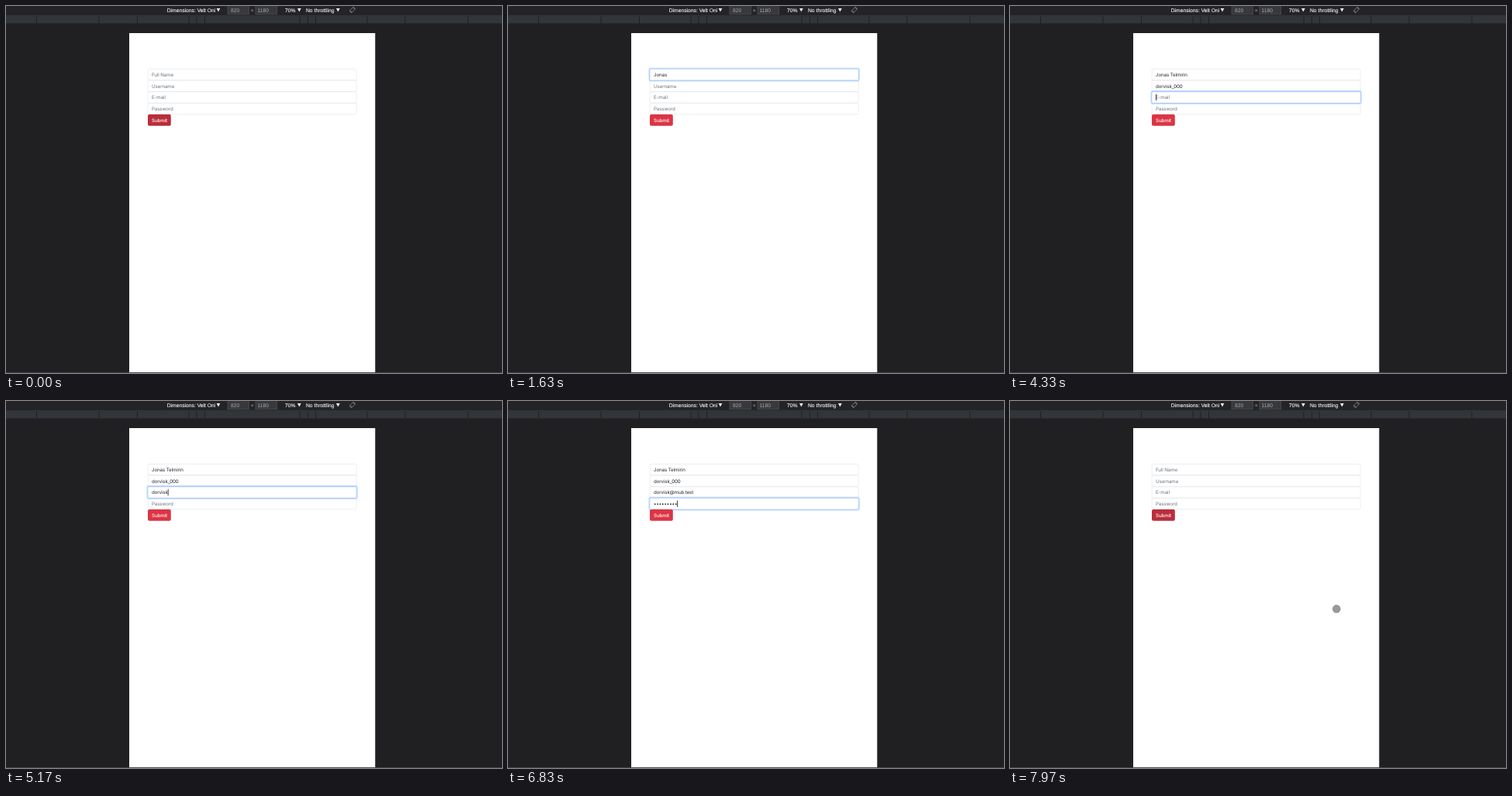
An HTML page for the animation above (8000 ms loop, 640 by 474 pixels).

```html
<!DOCTYPE html>
<html lang="en">
<head>
<meta charset="utf-8">
<title>Sign-up form</title>
<style>
  html, body { margin: 0; width: 100%; height: 100%; overflow: hidden; background: #202022; }
  svg { display: block; width: 100vw; height: 100vh; }
  text { white-space: pre; text-rendering: geometricPrecision; }
  .bar text { font: 6.75px "Liberation Sans", Arial, sans-serif; fill: #eeeff1; stroke: #eeeff1; stroke-width: .12; }
  .bar .dim { fill: #a9abae; stroke: none; }
  .bar rect.box { fill: #38393c; stroke: #55575b; stroke-width: .6; }
  .page text { font: 16px Inter, "Open Sans", sans-serif; letter-spacing: -.02em; }
</style>
</head>
<body>
<svg viewBox="0 0 640 474" preserveAspectRatio="none">
  <rect width="640" height="474" fill="#202022"/>
  <g class="bar">
    <rect width="640" height="12.4" fill="#242427"/>
    <rect y="12.4" width="640" height="1" fill="#434447"/>
    <rect y="13.4" width="640" height="9" fill="#32363b"/>
    <g id="marks"></g>
    <text x="207.7" y="7.5">Dimensions: Velt Oni</text>
    <rect class="box" x="286" y="-1" width="27.4" height="11.8"/>
    <rect class="box" x="322" y="-1" width="27.8" height="11.8"/>
    <text class="dim" x="290" y="7.7">820</text>
    <text class="dim" x="315.7" y="8">×</text>
    <text class="dim" x="324.5" y="7.7">1180</text>
    <text x="360" y="7.5">70%</text>
    <text x="387" y="7.5">No throttling</text>
    <path d="M271.6 3h4.8l-2.4 4.4zM376 3h4.8l-2.4 4.4zM426 3h4.8l-2.4 4.4z" fill="#eeeff1"/>
    <g fill="none" stroke="#96989b" stroke-width=".7">
      <rect x="445.2" y="2.3" width="3.6" height="5.4" rx=".5" transform="rotate(45 447 5)"/>
      <path d="M443.4 6a3.9 3.9 0 0 0 3 2.8M450.6 4a3.9 3.9 0 0 0-3-2.8"/>
    </g>
  </g>
  <rect y="473.3" width="640" height=".7" fill="#4c4c4e"/>
  <g class="page" transform="translate(159 35) scale(.387)">
    <rect width="820" height="1132" fill="#fff"/>
    <g id="form"></g>
    <rect id="button" x="62" y="271.5" width="77" height="38" rx="5"/>
    <text x="75" y="296.3" fill="#fff" font-weight="500" style="font-weight:500">Submit</text>
    <rect id="caret" width="2" height="22" fill="#111"/>
  </g>
  <circle id="pointer" r="5"/>
</svg>
<script>
const LOOP = 8000, BLINK = 165, FADE = 50;
const TAP_FIELD = 730, TAP_SUBMIT = 7340;
const labels = ['Full Name', 'Username', 'E-mail', 'Password'];
const focusAt = [TAP_FIELD, 2400, 3995, 5998, TAP_SUBMIT];

// field, typed text, first key time, time between keys
const runs = [
  [0, 'J', 830, 0], [0, 'onas ', 1330, 33], [0, 'Telmirin', 1970, 52],
  [1, 'dorvisk_000', 3230, 60],
  [2, 'dorvisk@', 4770, 61], [2, 'mub.test', 5470, 38],
  [3, '•'.repeat(9), 6430, 50]
];

// start time, end time, from x, y, to x, y
const moves = [
  [100, 690, 521.5, 429.5, 260, 91.5],
  [6980, 7300, 260, 91.5, 203, 151],
  [7510, 7735, 203, 151, 247.5, 223.5],
  [7770, 7970, 247.5, 223.5, 421.3, 268.6]
];

const $ = id => document.getElementById(id);
const clamp = v => Math.max(0, Math.min(1, v));
const ease = v => v * v * (3 - 2 * v);
const mix = (a, b, k) => a + (b - a) * k;
const mixColor = (a, b, k) => `rgb(${a.map((v, i) => Math.round(mix(v, b[i], k)))})`;

function add(parent, tag, attrs) {
  const el = document.createElementNS('http://www.w3.org/2000/svg', tag);
  for (const name in attrs) el.setAttribute(name, attrs[name]);
  return parent.appendChild(el);
}

for (const x of [39.5, 120, 169.5, 236, 246, 256.5, 379, 389.5, 399.5, 466, 515, 596])
  add($('marks'), 'rect', { x: x - .5, y: 13.4, width: 1, height: 9, fill: '#1f2022' });

const fields = labels.map((label, i) => {
  const y = 119.5 + 38 * i;
  const box = add($('form'), 'rect', { x: 62.5, y: y + .5, width: 695, height: 37, rx: 4, fill: '#fff' });
  const text = add($('form'), 'text', { x: 75, y: y + 24.8 });
  return { label, y, box, text };
});
const rings = fields.map(f => add($('form'), 'rect', {
  x: 60, y: f.y - 2, width: 700, height: 42, rx: 6,
  fill: 'none', stroke: '#0d6efd', 'stroke-opacity': .25, 'stroke-width': 4
}));

function typedAt(t) {
  const values = ['', '', '', ''];
  let last = 0;
  if (t >= TAP_SUBMIT) return { values, last };
  for (const time of focusAt) if (t >= time) last = Math.max(last, time);
  for (const [field, text, start, step] of runs) {
    if (t < start) continue;
    const n = Math.min(text.length, step ? Math.floor((t - start) / step) + 1 : 1);
    values[field] += text.slice(0, n);
    last = Math.max(last, start + (n - 1) * step);
  }
  return { values, last };
}

function drawForm(t) {
  const { values, last } = typedAt(t);
  fields.forEach((f, i) => {
    const value = values[i];
    const focus = clamp((t - focusAt[i]) / FADE) - clamp((t - focusAt[i + 1]) / FADE);
    f.text.textContent = value || f.label;
    f.text.setAttribute('fill', value ? '#212529' : '#6c757d');
    f.box.setAttribute('stroke', mixColor([206, 212, 218], [134, 183, 254], focus));
    rings[i].setAttribute('opacity', focus);
  });

  const active = focusAt.filter(time => t >= time).length - 1;
  const on = active >= 0 && active < 4 && Math.floor((t - last) / BLINK) % 2 === 0;
  $('caret').setAttribute('opacity', on ? 1 : 0);
  if (on) {
    const f = fields[active];
    const width = values[active] ? f.text.getComputedTextLength() : 0;
    $('caret').setAttribute('x', 75 + width);
    $('caret').setAttribute('y', f.y + 8);
  }

  const hover = 1 - clamp((t - TAP_FIELD) / FADE) + clamp((t - TAP_SUBMIT) / FADE);
  $('button').setAttribute('fill', mixColor([220, 53, 69], [187, 45, 59], hover));
}

function drawPointer(t) {
  const p = $('pointer');
  const shown = (t >= 100 && t < 890) || t >= 6980;
  p.setAttribute('opacity', shown ? 1 : 0);
  if (!shown) return;
  const [start, end, x0, y0, x1, y1] = moves.filter(m => t >= m[0]).pop();
  const k = ease(clamp((t - start) / (end - start)));
  const pressed = (t >= TAP_FIELD && t < 830) || (t >= TAP_SUBMIT && t < 7480);
  p.setAttribute('cx', mix(x0, x1, k));
  p.setAttribute('cy', mix(y0, y1, k));
  p.setAttribute('fill', pressed ? 'rgba(55,50,50,.85)' : 'rgba(90,90,90,.62)');
  p.setAttribute('stroke', 'rgba(90,90,90,.45)');
  p.setAttribute('stroke-width', .7);
}

function frame() {
  const t = performance.now() % LOOP;
  drawForm(t);
  drawPointer(t);
  requestAnimationFrame(frame);
}
frame();
</script>
</body>
</html>
```
